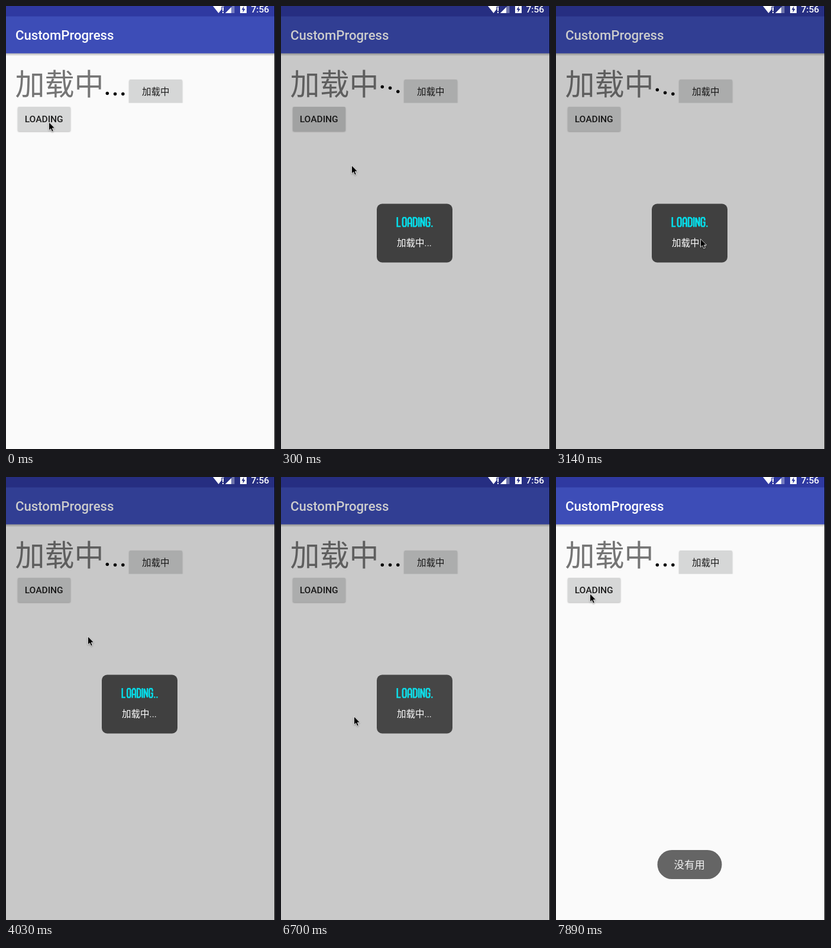
Animation, 455 px wide and 747 px high, one loop 8000 ms. Source, as an HTML page:

```html
<!DOCTYPE html>
<html lang="zh">
<head>
<meta charset="utf-8">
<title>CustomProgress</title>
<style>
  html, body { margin: 0; width: 100%; height: 100%; overflow: hidden; background: #fafafa; }
  svg { display: block; width: 100vw; height: 100vh; }
  text { font: 15.54px Roboto, "Noto Sans CJK SC", "Noto Sans CJK", sans-serif; }
  .bold { font-weight: 500; }
  .title { font-size: 22.2px; }
  .big { font-size: 50px; }
  .note { font-size: 17.5px; }
  .btn { fill: #d6d7d7; filter: drop-shadow(0 1px 1px rgba(0, 0, 0, .28)); }
</style>
</head>
<body>
<svg viewBox="0 0 455 747">
  <defs>
    <linearGradient id="shade" x2="0" y2="1">
      <stop stop-opacity=".3"/><stop offset="1" stop-opacity="0"/>
    </linearGradient>
    <clipPath id="row"><path d="M200 118H306V163.5H200Z"/></clipPath>
  </defs>

  <rect width="455" height="747" fill="#fafafa"/>
  <rect y="79.5" width="455" height="5" fill="url(#shade)"/>
  <rect width="455" height="79.8" fill="#3d4db7"/>
  <rect width="455" height="17.5" fill="#2f39a1"/>
  <text class="bold title" x="16" y="57" fill="#fff">CustomProgress</text>

  <text class="big" x="15.5" y="150" fill="#757575">加载中</text>
  <g id="beans"></g>

  <g clip-path="url(#row)"><rect class="btn" x="208.5" y="124" width="89.5" height="42" rx="2"/></g>
  <text x="230" y="150" fill="#1c1c1c">加载中</text>
  <rect class="btn" x="20" y="170" width="89" height="41" rx="2"/>
  <rect id="press" x="20" y="170" width="89" height="41" rx="2"/>
  <text class="bold" x="31.7" y="196.3" fill="#1c1c1c">LOADING</text>

  <rect id="dim" width="455" height="747"/>

  <!-- status icons stay bright above the dimmed screen -->
  <g fill="#fff">
    <path d="M350 0H369L368.4 1H364.5V5.8L359.5 12Z"/>
    <path d="M366 2H368V8.5H366ZM366 10H368V12H366Z"/>
    <path d="M371 12L383 0H386.5V12Z" opacity=".35"/>
    <path d="M371 12L381 2V12Z"/>
    <path fill-rule="evenodd" d="M396 0H407V12H396ZM402.5 0L398.5 6.6H401L400.5 11L404.7 4.8H402Z"/>
    <text class="bold" x="414.5" y="11">7:56</text>
  </g>

  <g id="dialog">
    <rect x="162" y="333.5" width="128" height="99" rx="9" fill="#404040"/>
    <path id="word" fill="none" stroke="#06dce8" stroke-width="2.3"/>
    <text x="196" y="405" fill="#fff">加载中...</text>
  </g>

  <g id="toast">
    <rect x="171.5" y="629" width="109" height="49" rx="24.5" fill="#656565"/>
    <text class="note" x="199.5" y="660" fill="#f2f2f2">没有用</text>
  </g>

  <path id="cursor" d="M.5 .8V14.8L3.7 11.9L5.9 17L8.3 16L6.2 11H10.6Z" stroke="#fff" stroke-width=".8"
    style="filter:drop-shadow(0 1px 1px rgba(0,0,0,.35))"/>
  <rect x="454" width="1" height="747"/>
</svg>
<script>
const LOOP = 8000, STEP = 148.8, LAST = 53;
const $ = id => document.getElementById(id);

$('beans').innerHTML = [0, 1, 2].map(i => `<text class="big" x="${165 + 13.2 * i}" y="151">.</text>`).join('');
const beans = [...$('beans').children];

// Condensed capitals, 17 units high
const box = 'v11l1 2h3l1 -2v-11l-1 -2h-3z';
const letters = `M1 0v16h5 M9 3${box} M17 17v-13l1.5 -3h2l1.5 3v13m-5 -6h5 M25 1v15h3l2 -2v-11l-2 -2z
  M33 0v17 M36 17v-16l5 15v-16 M49 6v-3l-1 -2h-3l-1 2v11l1 2h3l1 -2v-5h-2.5`;

// Where the pointer rests or turns: time, x, y
const stops = [
  [0, 72, 195], [300, 119, 268], [1500, 230, 486], [2100, 230, 486],
  [2540, 97, 335], [3290, 264, 400], [4100, 135, 265], [5150, 277, 718],
  [5810, 121, 315], [6150, 72, 350], [6700, 123, 403], [6900, 123, 403],
  [7650, 46, 196], [7890, 57, 196]
];

const ramp = (t, a, b) => Math.min(1, Math.max(0, (t - a) / (b - a)));
const smooth = k => k * k * (3 - 2 * k);

function pointer(t) {
  let [, x, y] = stops[0];
  stops.slice(1).forEach(([end, ex, ey], i) => {
    const k = smooth(ramp(t, stops[i][0], end));
    x += (ex - x) * k;
    y += (ey - y) * k;
  });
  return `${Math.round(x)} ${Math.round(y)}`;
}

function jump(phase) {
  const eased = (1 - Math.cos(Math.PI * (phase - Math.floor(phase)))) / 2;
  return -12.5 * Math.max(0, Math.sin(2 * Math.PI * eased));
}

function word(n) {
  let d = letters;
  for (let i = 0; i < n; i++) d += `M${52.4 + 3.9 * i} 14.6V17`;
  $('word').setAttribute('d', d);
  $('word').setAttribute('transform', `translate(195.6 356) scale(${61 / (49.6 + 3.9 * n)} .97)`);
}

function draw(t) {
  const fade = (id, v) => $(id).setAttribute('opacity', v);
  const enter = ramp(t, 100, 280);
  beans.forEach((b, i) => b.setAttribute('transform', `translate(0 ${jump(t / 1000 + .065 - i * .105)})`));
  word(Math.floor(t / 1000) % 3 + 1);
  fade('dim', .2 * enter * (1 - ramp(t, 6700, 6910)));
  fade('dialog', enter * (1 - ramp(t, 6700, 6800)));
  fade('press', .06 * ramp(t, 50, 150) * (1 - ramp(t, 300, 500)));
  fade('toast', ramp(t, 6815, 6990));
  $('cursor').setAttribute('transform', `translate(${pointer(t)})`);
}

// The screen is refreshed in steps, like a recording
function tick() {
  draw(149 * Math.min(LAST, Math.floor(performance.now() % LOOP / STEP)));
  requestAnimationFrame(tick);
}
tick();
</script>
</body>
</html>
```
